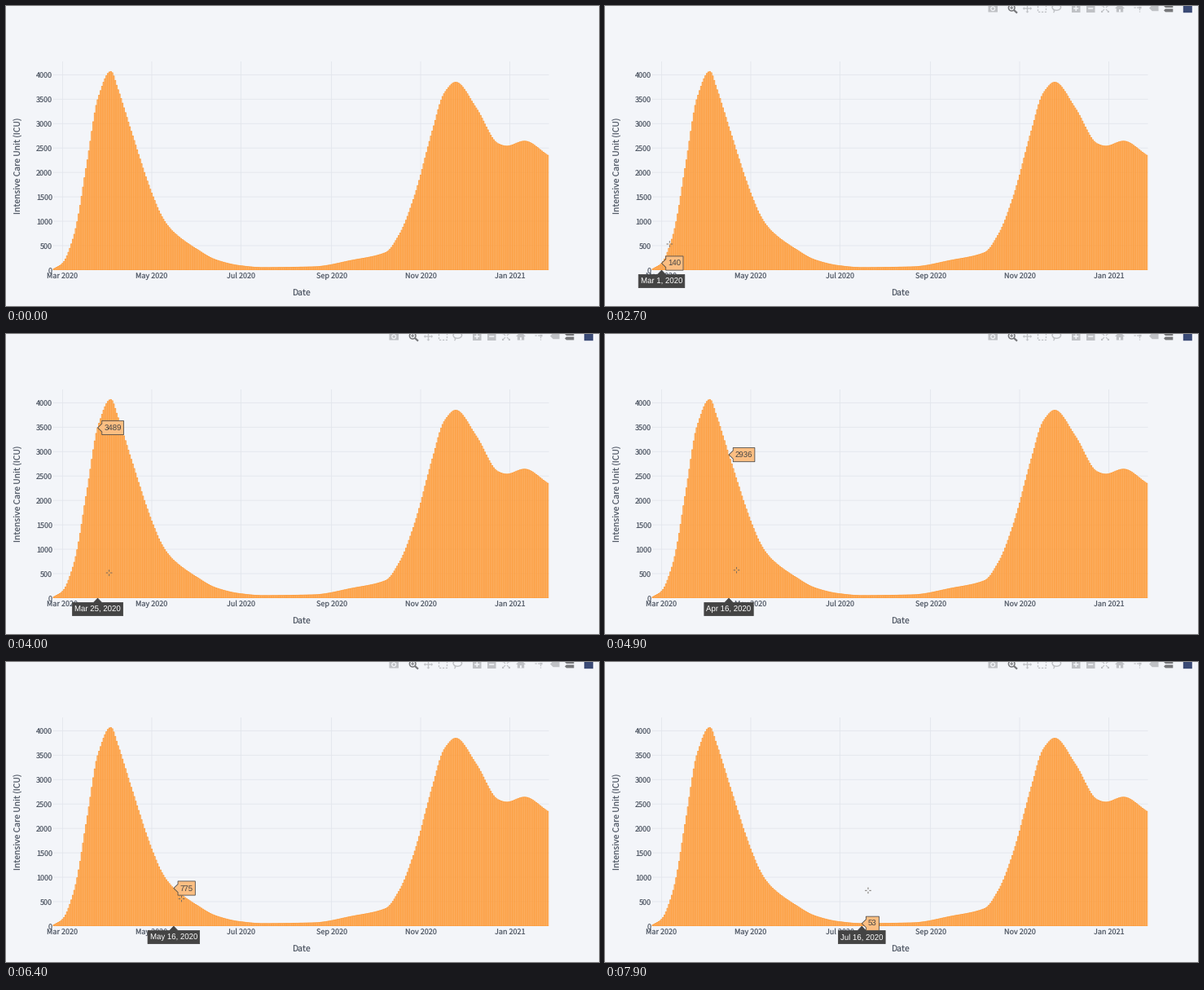
A matplotlib script for the animation above (8 s loop, 728 by 368 pixels).

```python
import itertools

import numpy as np
import matplotlib.pyplot as plt
from matplotlib.animation import FuncAnimation
from matplotlib.collections import PolyCollection
from matplotlib.patches import Circle, Ellipse, Polygon, Rectangle

plt.rcParams.update({"path.snap": False, "text.hinting": "none", "toolbar": "None"})

W, H, DPI = 728, 368, 100
PT = 72 / DPI                      # points per pixel
STEP, FRAMES = 100, 80
BG, INK, GRID = "#f3f5f9", "#535b68", "#e2e5ec"
ORANGE, DARK, POINT = "#ff9933", "#444444", "#6b655e"
SOFT, ACTIVE, BRAND = "#bfc1c5", "#77787b", "#3a4a75"
X0, DAY, Y0, UNIT = 69.5, 1.7941, 323.9, 0.05988
TOP, LEFT, RIGHT = 68, 57.8, 666.5
START = np.datetime64("2020-03-01")
ARMS = ((1, 0), (-1, 0), (0, 1), (0, -1))

# Both waves as key points: days since START, patients
WAVES = np.array([
    (-6, 26), (0, 140), (8, 733), (17, 2257), (24, 3489), (33, 4068),
    (38, 3693), (46, 2936), (61, 1578), (69, 1040), (76, 775), (92, 424),
    (105, 209), (121, 93), (137, 53), (172, 68), (198, 201), (221, 358),
    (231, 760), (241, 1536), (253, 2849), (261, 3612), (269, 3848),
    (283, 3320), (298, 2589), (304, 2540), (316, 2642), (332, 2352),
], float).T

# Pointer: ms, x, y. Hovered bar: ms, day.
POINTER = np.array([
    (2400, 66, 292), (2700, 79.3, 292), (4000, 126.6, 293),
    (4900, 161.5, 289.7), (6400, 215.5, 290.5), (7200, 276.6, 281),
    (7900, 323, 280.3),
]).T
HOVER = np.array([
    (2500, -6), (2700, 0), (3000, 2), (4000, 24), (4900, 46), (6400, 76),
    (6600, 76), (7200, 105), (7900, 137),
]).T


def day_x(d):
    return X0 + DAY * d


def count_y(n):
    return Y0 - UNIT * n


def count(d):
    """Monotone cubic through the key points, in whole patients."""
    x, y = WAVES
    h, sec = np.diff(x), np.diff(y) / np.diff(x)
    prod = sec[:-1] * sec[1:]
    inner = np.where(prod > 0, 2 * prod / (sec[:-1] + sec[1:]), 0)
    m = np.r_[sec[0], inner, sec[-1]]
    k = np.clip(np.searchsorted(x, d, side="right") - 1, 0, len(h) - 1)
    u = (d - x[k]) / h[k]
    ease = u * u * (3 - 2 * u)
    bend = h[k] * u * (1 - u) * (m[k] * (1 - u) - m[k + 1] * u)
    return np.rint(y[k] + (y[k + 1] - y[k]) * ease + bend)


fig = plt.figure(figsize=(W / DPI, H / DPI), dpi=DPI, facecolor=BG)
ax = fig.add_axes([0, 0, 1, 1])
ax.set(xlim=(0, W), ylim=(H, 0))
ax.axis("off")


def line(xs, ys, color, width, z=1, **kw):
    return ax.plot(xs, ys, color=color, lw=width * PT, zorder=z,
                   solid_capstyle="butt", **kw)[0]


def label(x, y, s, size, color=INK, font="Noto Sans CJK JP", ha="center", z=3, **kw):
    return ax.text(x, y, s, size=size * PT, color=color, family=font, ha=ha,
                   va="baseline", zorder=z, **kw)


def draw_chart():
    for n in range(0, 4001, 500):
        y = count_y(n)
        if n:
            line([LEFT, RIGHT], [y, y], GRID, 0.8)
        label(57.2, y + 3.5, str(n), 9.05, ha="right")
    for k in range(0, 11, 2):
        date = (START.astype("M8[M]") + k).astype("M8[D]")
        x = day_x((date - START).astype(int))
        line([x, x], [TOP, Y0], GRID, 0.8)
        label(x, 334.3, f"{date.item():%b %Y}", 9.05)
    label(362.3, 355.6, "Date", 10.4)
    label(17.8, 195.5, "Intensive Care Unit (ICU)", 10.4, rotation=90,
          rotation_mode="anchor")

    days = np.arange(-6, 333)
    half = 0.4 * DAY
    bars = [[(x - half, Y0), (x - half, y), (x + half, y), (x + half, Y0)]
            for x, y in zip(day_x(days), count_y(count(days)))]
    stack = ax.add_collection(PolyCollection(
        bars, facecolors=[(1, 0.6, 0.2, 0.6)], edgecolors=ORANGE,
        linewidths=0.74 * PT, zorder=2))
    stack.set_clip_path(Rectangle((0, 0), W, Y0, transform=ax.transData))


def draw_modebar():
    parts = []

    def add(kind, *args, color=SOFT, **kw):
        style = {"fc": color, "ec": "none", "zorder": 4, **kw}
        parts.append(ax.add_patch(kind(*args, **style)))

    def rect(x, y, w, h, color=SOFT):
        add(Rectangle, (x, y), w, h, color=color)

    def ring(x, y, w, h, width, color=SOFT):
        add(Ellipse, (x, y), w, h, fc="none", ec=color, lw=width * PT)

    def stroke(xs, ys, color=SOFT, width=1.3, **kw):
        parts.append(line(xs, ys, color, width, z=4, **kw))

    def plus(x, y, r, color, width=1.3):
        stroke([x - r, x + r], [y, y], color, width)
        stroke([x, x], [y - r, y + r], color, width)

    # camera
    rect(470.5, -1, 11.5, 8.5)
    add(Circle, (476.2, 3.2), 3, color=BG)
    add(Circle, (476.2, 3.2), 1.7)
    # zoom
    ring(499.2, 2.2, 7.6, 7.6, 1.5, ACTIVE)
    plus(499.2, 2.2, 2, ACTIVE, 1.1)
    stroke([501.8, 506], [4.8, 8.6], ACTIVE, 2.2)
    # pan
    plus(518.5, 3, 4.5, SOFT)
    for dx, dy in ARMS:
        x, y = 518.5 + 3.6 * dx, 3 + 3.6 * dy
        add(Polygon, [(x + 2 * dx, y + 2 * dy), (x + 2 * dy, y + 2 * dx),
                      (x - 2 * dy, y - 2 * dx)])
    # box and lasso select
    add(Rectangle, (531.5, -2.6), 10, 10, fc="none", ec=SOFT, lw=1.3 * PT,
        ls=(0, (1.7, 1.3)))
    ring(554.3, 1.5, 10.5, 7.5, 1.4)
    stroke([550.2, 551.8, 550.6], [4, 6, 8.2])
    # zoom in and out
    for x in (573, 591):
        rect(x, -2, 10.5, 10)
        rect(x + 2.2, 2.3, 6.1, 1.5, BG)
    rect(577.5, 0, 1.5, 6.1, BG)
    # autoscale
    for sx, sy in itertools.product((-1, 1), repeat=2):
        stroke([614 + sx, 614 + 4 * sx], [3 + sy, 3 + 4 * sy], width=1.1)
        add(Polygon, [(614 + 5 * sx, 3 + 5 * sy), (614 + 5 * sx, 3 + 2.4 * sy),
                      (614 + 2.4 * sx, 3 + 5 * sy)])
    # home
    add(Polygon, [(626, 3), (632, -3), (638, 3)])
    rect(627.8, 2.5, 8.4, 5)
    rect(631, 4.2, 2, 3.3, BG)
    # spike lines
    stroke([649.5, 655], [2, 2], ls=(0, (1.7, 1)))
    stroke([656.5, 656.5], [3.4, 7.6], ls=(0, (1.4, 1)))
    rect(655.3, 0.8, 3.2, 2.4)
    # hover modes
    for x, y, w, h, color in ((668, 2.5, 11.5, 3.7, SOFT),
                              (686, 0, 11.3, 2, ACTIVE),
                              (686, 5.4, 11.3, 2, ACTIVE)):
        add(Polygon, [(x, y), (x + h, y - h), (x + w, y - h), (x + w, y + h),
                      (x + h, y + h)], color=color)
    rect(709.8, -2, 11, 10.2, BRAND)
    return parts


class Tip:
    """Hover box with a pointer and centred text."""

    def __init__(self, face, color):
        self.shape = ax.add_patch(Polygon([(0, 0)] * 3, fc=face, ec=DARK,
                                          lw=0.8 * PT, zorder=5))
        self.text = label(0, 0, "", 9.7, color, "Liberation Sans", z=5)

    def show(self, on):
        self.shape.set_visible(on)
        self.text.set_visible(on)

    def width(self, s):
        self.text.set_text(s)
        box = self.text.get_window_extent(fig.canvas.get_renderer())
        return box.width + 5.2

    def below(self, x, y, s):
        w = self.width(s) / 2
        t, b = y + 5.2, y + 21.4
        self.shape.set_xy([(x, y), (x + 5, t), (x + w, t), (x + w, b),
                           (x - w, b), (x - w, t), (x - 5, t)])
        self.text.set_position((x, y + 16.9))

    def beside(self, x, y, s):
        w = self.width(s)
        l, r, h = x + 5.2, x + 5.2 + w, 8.6
        self.shape.set_xy([(x, y), (l, y - 5), (l, y - h), (r, y - h),
                           (r, y + h), (l, y + h), (l, y + 5)])
        self.text.set_position(((l + r) / 2, y + 3.5))


draw_chart()
modebar = draw_modebar()
date_tip = Tip(DARK, "white")
value_tip = Tip("#fbbe82", DARK)
cross = [line([], [], POINT, 0.9, z=6) for _ in ARMS]


def update(i):
    t = i * STEP
    s = np.clip((t - 2300) / 300, 0, 1)
    for part in modebar:
        part.set_visible(s > 0)
        part.set_alpha(s * s * (3 - 2 * s))

    x, y = (np.interp(t, POINTER[0], row) for row in POINTER[1:])
    for arm, (dx, dy) in zip(cross, ARMS):
        arm.set_data([x + 1.4 * dx, x + 3.8 * dx], [y + 1.4 * dy, y + 3.8 * dy])
        arm.set_visible(t >= POINTER[0, 0])

    hover = t >= HOVER[0, 0]
    date_tip.show(hover)
    value_tip.show(hover)
    if hover:
        d = int(np.floor(np.interp(t, *HOVER) + 0.5))
        n = int(count(d))
        date = (START + d).item()
        date_tip.below(day_x(d), Y0 + 0.3, f"{date:%b} {date.day}, {date.year}")
        value_tip.beside(day_x(d), count_y(n), str(n))
    return []


anim = FuncAnimation(fig, update, frames=FRAMES, interval=STEP,
                     init_func=lambda: update(0), repeat=True, repeat_delay=0)
plt.show()
```
